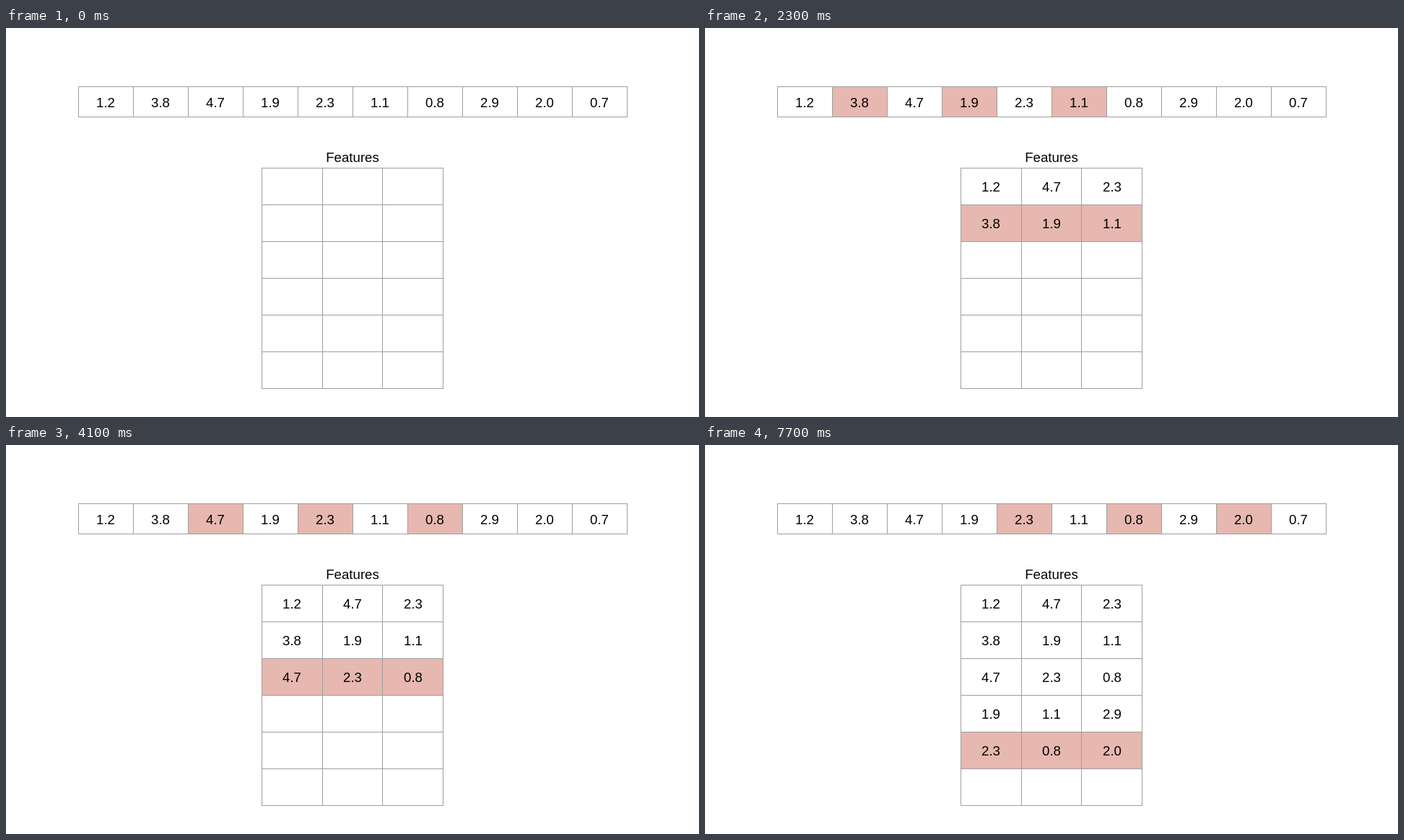
These frames come from a looping animation (960x540 px, 8000 ms). An HTML page:

```html
<!DOCTYPE html>
<html lang="en">
<head>
<meta charset="utf-8">
<title>Features</title>
<style>
  html, body { margin: 0; width: 100%; height: 100%; overflow: hidden; background: #fff; }
  svg { display: block; width: 960px; height: 540px; }
  text { font: 18.667px "Liberation Sans", Arial, sans-serif; text-anchor: middle; fill: #000; }
  path { fill: none; stroke: #9e9e9e; stroke-width: 1; shape-rendering: crispEdges; }
  rect { fill: #e6b8af; shape-rendering: crispEdges; }
</style>
</head>
<body>
<svg viewBox="0 0 960 540"></svg>
<script>
const LOOP = 8000, FIRST = 500, STEP = 1800;
const values = ["1.2", "3.8", "4.7", "1.9", "2.3", "1.1", "0.8", "2.9", "2.0", "0.7"];
const rows = 6, shown = 5, dilation = 2;
const seriesX = Array.from({ length: 11 }, (_, i) => 100 + 76 * i);
const tableX = [354, 438, 521, 605];
const tableY = Array.from({ length: rows + 1 }, (_, i) => 194 + 51 * i);

const svg = document.querySelector("svg");

function add(tag, attrs, label) {
  const el = document.createElementNS("http://www.w3.org/2000/svg", tag);
  for (const key in attrs) el.setAttribute(key, attrs[key]);
  if (label) el.textContent = label;
  return svg.appendChild(el);
}

const write = (x, y, label) => add("text", { x, y }, label);
const fill = (x0, y0, x1, y1) =>
  add("rect", { x: x0, y: y0, width: x1 - x0, height: y1 - y0 });

function grid(xs, ys) {
  const [left, right] = [xs[0], xs[xs.length - 1] + 1];
  const [top, bottom] = [ys[0], ys[ys.length - 1] + 1];
  const d = xs.map(x => `M${x + .5} ${top}V${bottom}`)
    .concat(ys.map(y => `M${left} ${y + .5}H${right}`));
  add("path", { d: d.join("") });
}

// Highlights sit below the grid lines, text above them.
const seriesFills = values.map((_, i) => fill(seriesX[i], 81, seriesX[i + 1], 123));
const rowFills = Array.from({ length: shown }, (_, r) =>
  fill(tableX[0], tableY[r], tableX[3], tableY[r + 1]));

grid(seriesX, [81, 123]);
grid(tableX, tableY);

values.forEach((v, i) => write(138 + 76 * i, 110, v));
write(480, 186, "Features");
const rowTexts = Array.from({ length: shown }, (_, r) =>
  [0, 1, 2].map(c => write(396 + 84 * c, 227 + 51 * r, values[r + dilation * c])));

const show = (el, on) => el.setAttribute("visibility", on ? "visible" : "hidden");

let current = null;
function draw(now) {
  const t = now % LOOP;
  const row = Math.floor((t - FIRST) / STEP);
  if (row !== current) {
    current = row;
    seriesFills.forEach((el, i) => {
      const k = (i - row) / dilation;
      show(el, row >= 0 && [0, 1, 2].includes(k));
    });
    rowFills.forEach((el, r) => show(el, r === row));
    rowTexts.forEach((cells, r) => cells.forEach(el => show(el, r <= row)));
  }
}

const start = performance.now();
function tick() {
  draw(performance.now() - start);
  requestAnimationFrame(tick);
}
tick();
</script>
</body>
</html>
```
